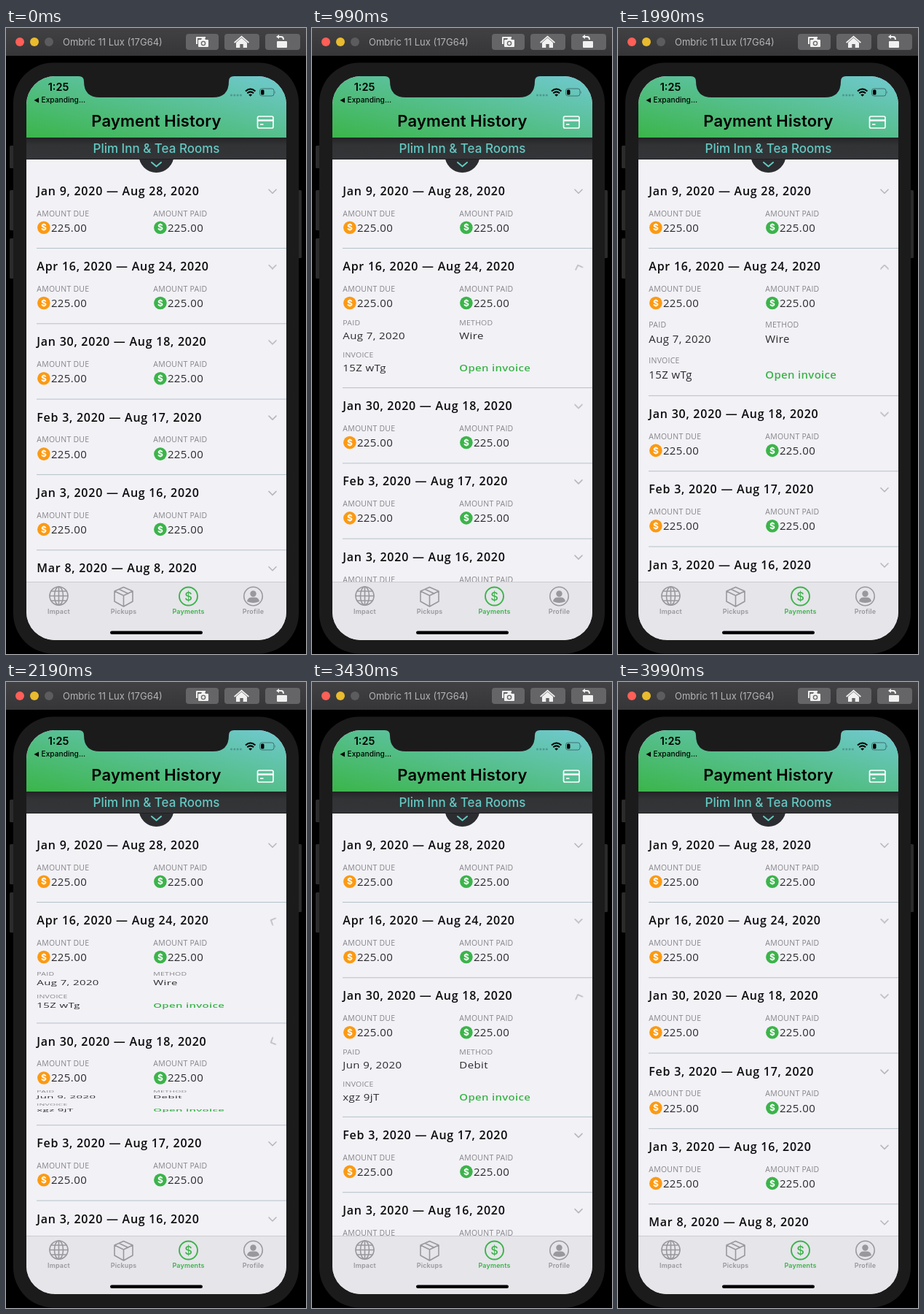
Recreate the animation shown at these times as an HTML page. Size 412x857 px, loop 4050 ms.

```html
<!DOCTYPE html>
<html lang="en">
<head>
<meta charset="utf-8">
<title>Payment History</title>
<style>
html, body { margin: 0; width: 100%; height: 100%; overflow: hidden; background: #000; }
svg { display: block; width: 412px; height: 857px; }
text { font-family: Inter, "Open Sans", sans-serif; }
.mid { text-anchor: middle; }
.list text { font-family: "Open Sans", "Noto Sans", sans-serif; }
.list .title { font-size: 16px; font-weight: 600; letter-spacing: .75px; fill: #0b0b0d; }
.list .label { font-size: 10.5px; letter-spacing: .25px; fill: #85858a; }
.list .value { font-size: 15px; letter-spacing: .4px; fill: #2b2b2e; }
.list .link { font-size: 15px; font-weight: 600; letter-spacing: .3px; fill: #3bb44a; }
.list .coin { font: 700 12px Inter, sans-serif; fill: #fff; text-anchor: middle; }
.chevron { fill: none; stroke: #b7b8be; stroke-width: 1.6; stroke-linecap: round; stroke-linejoin: round; }
.tab { font-size: 9px; font-weight: 600; letter-spacing: .15px; text-anchor: middle; fill: #98989d; }
.icon { fill: none; stroke: #98989d; stroke-width: 1.6; stroke-linejoin: round; stroke-linecap: round; }

/* Each moving part sets its closed and open transforms and the span it is open for. */
.move { animation: 4050ms cubic-bezier(.65, 0, .35, 1) infinite; transform: var(--off); }
.first { animation-name: first; }
.second { animation-name: second; }
.both { animation-name: both; }
.shift { --off: translateY(0px); --on: translateY(98.6px); }
.fold { --off: scaleY(0); --on: scaleY(1); transform-origin: 0 87px; }
.turn { --off: rotate(0deg); --on: rotate(180deg); transform-origin: 366px 25.5px; }
@keyframes first {
  0%, 17.531% { transform: var(--off); }
  27.407%, 49.63% { transform: var(--on); }
  59.506%, 100% { transform: var(--off); }
}
@keyframes second {
  0%, 49.63% { transform: var(--off); }
  59.506%, 81.728% { transform: var(--on); }
  91.605%, 100% { transform: var(--off); }
}
@keyframes both {
  0%, 17.531% { transform: var(--off); }
  27.407%, 81.728% { transform: var(--on); }
  91.605%, 100% { transform: var(--off); }
}
</style>
</head>
<body>
<svg viewBox="0 0 412 857">
  <defs>
    <linearGradient id="header" x1="0" y1="1" x2="1" y2="0">
      <stop offset="0" stop-color="#3bb54a"/><stop offset="1" stop-color="#70c9d0"/>
    </linearGradient>
    <linearGradient id="bar" x2="0" y2="1">
      <stop offset="0" stop-color="#414143"/><stop offset="1" stop-color="#363638"/>
    </linearGradient>
    <linearGradient id="strip" x2="0" y2="1">
      <stop offset="0" stop-color="#232426"/><stop offset=".35" stop-color="#323335"/><stop offset="1" stop-color="#343538"/>
    </linearGradient>
    <clipPath id="screen"><rect x="28" y="66" width="357" height="772" rx="39"/></clipPath>
  </defs>

  <!-- window bar -->
  <rect width="412" height="38" fill="url(#bar)"/>
  <circle cx="19" cy="19" r="6" fill="#ff5f57"/>
  <circle cx="39" cy="19" r="6" fill="#e9bb2e"/>
  <circle cx="59" cy="19" r="6" fill="#5c5c5e"/>
  <text x="78" y="24" font-size="13" fill="#b3b3b5">Ombric 11 Lux (17G64)</text>
  <g fill="#656567">
    <rect x="247" y="8" width="45" height="22" rx="4"/>
    <rect x="300" y="8" width="48" height="22" rx="4"/>
    <rect x="356" y="8" width="48" height="22" rx="4"/>
  </g>
  <g fill="#f1f1f1">
    <path d="M261 22v-9q0-1 1-1h12v2h-11v8z"/>
    <path d="M264 17q0-1 1-1h3l1-2h4l1 2h3q1 0 1 1v8q0 1-1 1h-12q-1 0-1-1z"/>
    <circle cx="271" cy="21" r="2.6" fill="none" stroke="#656567" stroke-width="1.3"/>
    <path d="M313 19.5l10.500-9 10.500 9-1.200 1.300-9.300-8-9.300 8z"/>
    <path d="M316 20l7.500-6.400 7.500 6.400v7h-5.300v-5h-4.400v5h-5.300z"/>
    <rect x="372" y="18" width="14" height="9" rx="1"/>
    <path d="M371 12l4-3v2h3q4 0 4 5h-2q0-3-2.500-3h-2.500v2z"/>
  </g>

  <!-- phone -->
  <g fill="#2b2b2c">
    <rect x="5" y="161" width="7" height="31" rx="1.500"/>
    <rect x="5" y="222" width="7" height="55" rx="1.500"/>
    <rect x="5" y="288" width="7" height="55" rx="1.500"/>
    <rect x="400" y="222" width="6" height="93" rx="1.500"/>
  </g>
  <rect x="10" y="47.500" width="392" height="809" rx="55" fill="#1b1b1c"/>

  <g clip-path="url(#screen)">
    <rect x="28" y="66" width="357" height="772" fill="#f2f1f6"/>
    <g class="list" id="list"></g>

    <!-- header -->
    <rect x="28" y="66" width="357" height="84" fill="url(#header)"/>
    <path d="M100 66q7 0 7 7q0 22 22 22h155q22 0 22-22q0-7 7-7z" fill="#1b1b1c"/>
    <text class="mid" x="72" y="86" font-size="14.500" font-weight="600">1:25</text>
    <path d="M45 95.500v7l-6.500-3.500z"/>
    <text x="48.500" y="102.300" font-size="10.200" font-weight="500">Expanding...</text>
    <g fill="#4f9695">
      <circle cx="309.500" cy="92" r="1.500"/><circle cx="313.800" cy="92" r="1.500"/>
      <circle cx="318.100" cy="92" r="1.500"/><circle cx="322.400" cy="92" r="1.500"/>
    </g>
    <g fill="none" stroke="#000" stroke-width="2">
      <path d="M329 86.500q6.700-6 13.400 0M331.300 89.300q4.400-3.800 8.800 0"/>
    </g>
    <path d="M333.200 91.300q2.500-1.800 5 0l-2.500 2.500z"/>
    <rect x="348.500" y="83" width="19.500" height="10" rx="3" fill="none" stroke="#3f7075"/>
    <path d="M369.300 86.300q1.500 1.700 0 3.400z" fill="#3f7075"/>
    <rect x="350" y="84.500" width="4.500" height="7" rx="1.500"/>
    <text class="mid" x="206.500" y="134.800" font-size="22" font-weight="600" letter-spacing=".15">Payment History</text>
    <rect x="345.500" y="121" width="21.500" height="16" rx="2" fill="none" stroke="#fff" stroke-width="1.700"/>
    <path d="M346 126.500h21" stroke="#fff" stroke-width="2.400"/>
    <path d="M349 132h4.500" stroke="#fff" stroke-width="1.600"/>

    <!-- property strip -->
    <circle cx="206.500" cy="174" r="24" fill="#343538"/>
    <rect x="28" y="150" width="357" height="30" fill="url(#strip)"/>
    <path d="M28 179.500h357" stroke="#1f2022"/>
    <path d="M183.500 180a24 24 0 0 0 46 0" fill="#2c2d30"/>
    <text class="mid" x="206.500" y="170.800" font-size="17" font-weight="500" fill="#62c9c3">Plim Inn &amp; Tea Rooms</text>
    <path d="M200 184l6.500 5.500 6.500-5.500" fill="none" stroke="#62c9c3" stroke-width="2" stroke-linecap="round" stroke-linejoin="round"/>

    <!-- tab bar -->
    <rect x="28" y="758.500" width="357" height="80" fill="#e6e5ea"/>
    <path d="M28 758.500h357" stroke="#cbcbd0"/>
    <g class="icon">
      <circle cx="72.500" cy="777.500" r="12.500"/>
      <ellipse cx="72.500" cy="777.500" rx="6" ry="12.500"/>
      <path d="M72.500 765v25M60 777.500h25M62 771h21M62 784h21"/>
      <path d="M161.500 765.500l12.500 5.500v14l-12.500 7-12.500-7v-14zM149 771l12.500 6 12.500-6M161.500 777v15M155 768.300l12.700 6"/>
      <circle cx="250.500" cy="778" r="12.500" stroke="#3bb44a" stroke-width="1.900"/>
      <circle cx="339.500" cy="778" r="12.700"/>
    </g>
    <circle cx="339.500" cy="774.500" r="4.200" fill="#98989d"/>
    <path d="M331 785q1-5.500 6-5.500h5q5 0 6 5.500q-8.500 4-17 0z" fill="#98989d"/>
    <text class="mid" x="250.500" y="784" font-size="16.500" font-weight="500" fill="#3bb44a">$</text>
    <text class="tab" x="72.500" y="801.500">Impact</text>
    <text class="tab" x="161.500" y="801.500">Pickups</text>
    <text class="tab" x="250.500" y="801.500" style="fill:#3bb44a">Payments</text>
    <text class="tab" x="339.500" y="801.500">Profile</text>
    <rect x="143" y="825.500" width="127" height="4.500" rx="2.250"/>
  </g>
</svg>

<script>
const rows = [
  { dates: "Jan 9, 2020 — Aug 28, 2020" },
  { dates: "Apr 16, 2020 — Aug 24, 2020", span: "first", paid: "Aug 7, 2020", method: "Wire", invoice: "15Z wTg" },
  { dates: "Jan 30, 2020 — Aug 18, 2020", span: "second", shift: "first", paid: "Jun 9, 2020", method: "Debit", invoice: "xgz 9jT" },
  { dates: "Feb 3, 2020 — Aug 17, 2020", shift: "both" },
  { dates: "Jan 3, 2020 — Aug 16, 2020", shift: "both" },
  { dates: "Mar 8, 2020 — Aug 8, 2020", shift: "both" }
];
const LEFT = 42.3, RIGHT = 202.3, TOP = 198.2, STEP = 103.3;

const text = (kind, x, y, words) => `<text class="${kind}" x="${x}" y="${y}">${words}</text>`;
const move = (part, span) => span ? `move ${part} ${span}` : "";

const amount = (x, name, color) =>
  text("label", x, 59.4, name) +
  `<circle cx="${x + 9.6}" cy="75" r="8.8" fill="${color}"/>` +
  text("coin", x + 9.6, 79.3, "$") +
  text("value", x + 19.6, 80.5, "225.00");

const details = row => !row.span ? "" :
  `<g class="${move("fold", row.span)}">` +
  text("label", LEFT, 108.1, "PAID") + text("value", LEFT, 129.4, row.paid) +
  text("label", RIGHT, 108.1, "METHOD") + text("value", RIGHT, 129.4, row.method) +
  text("label", LEFT, 157.4, "INVOICE") + text("value", LEFT, 178.8, row.invoice) +
  text("link", RIGHT, 178.8, "Open invoice") + "</g>";

document.getElementById("list").innerHTML = rows.map((row, i) =>
  `<g transform="translate(0 ${TOP + STEP * i})"><g class="${move("shift", row.shift)}">` +
  (i ? `<path d="M42 0h343" stroke="#b3c2c9"/>` : "") +
  text("title", LEFT, 30.6, row.dates) +
  `<g class="${move("turn", row.span)}"><path class="chevron" d="M361 23l5 5 5-5"/></g>` +
  amount(LEFT, "AMOUNT DUE", "#fb9a13") +
  amount(RIGHT, "AMOUNT PAID", "#3bb44a") +
  details(row) + "</g></g>").join("");
</script>
</body>
</html>
```
